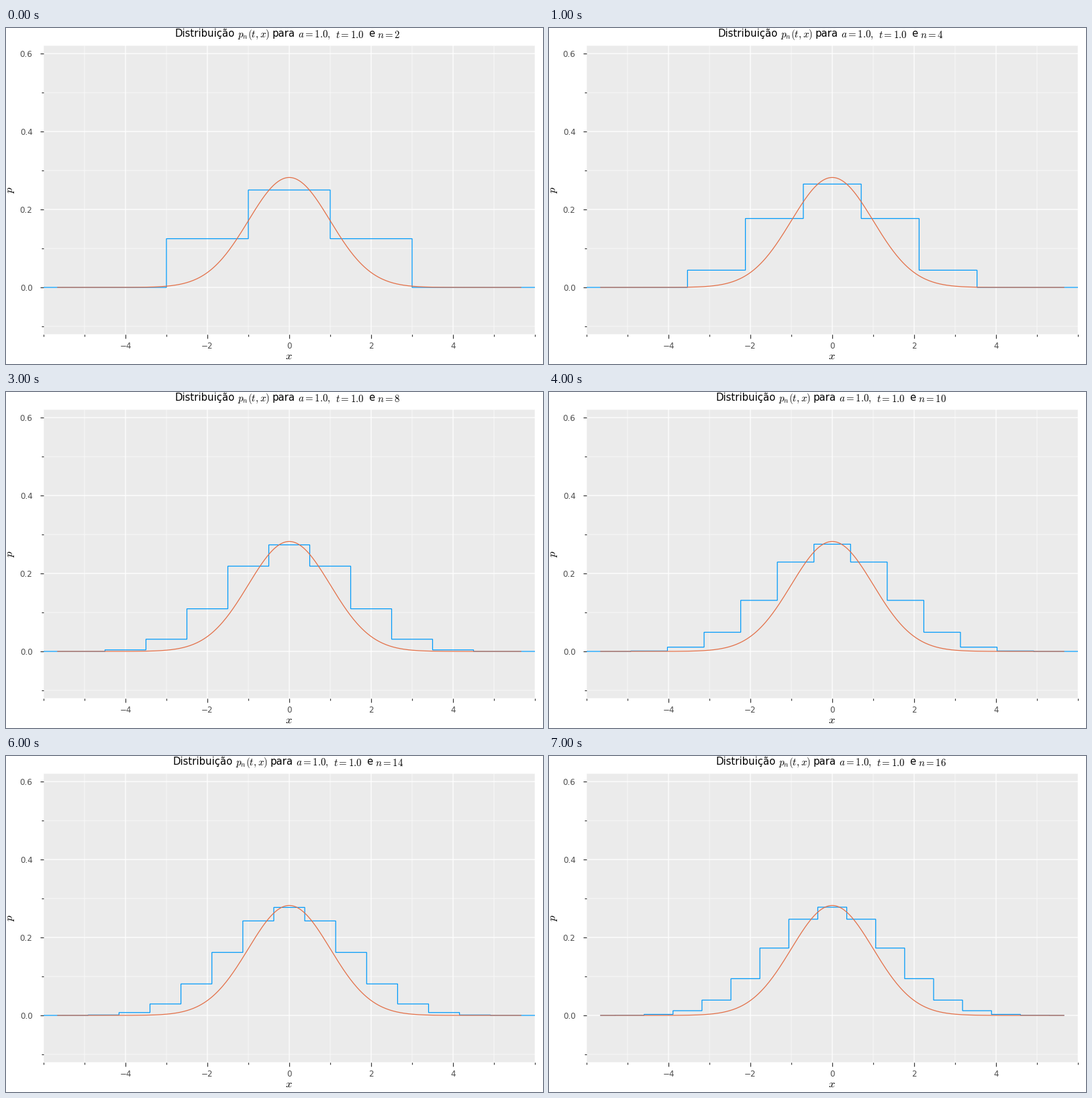
Write a matplotlib script that moves like this. It is 800 px wide and 500 px high and loops after 8000 ms.

```python
import math

import matplotlib.pyplot as plt
import numpy as np
from matplotlib.animation import FuncAnimation
from matplotlib.ticker import FormatStrFormatter, MultipleLocator

W, H, DPI = 800, 500, 100
PT = 72 / DPI  # points per pixel
LEFT, RIGHT, TOP, BOTTOM = 56, 788, 26.5, 455.6
BLUE, ORANGE = "#009afa", "#e36f47"
N_MAX = 16

plt.rcParams.update({
    "font.family": "DejaVu Sans",
    "mathtext.fontset": "cm",
    "path.snap": False,
})

fig = plt.figure(figsize=(W / DPI, H / DPI), dpi=DPI, facecolor="white")
ax = fig.add_axes([LEFT / W, 1 - BOTTOM / H, (RIGHT - LEFT) / W, (BOTTOM - TOP) / H],
                  facecolor="#ebebeb")
ax.set(xlim=(-6, 6), ylim=(-0.12, 0.62))
ax.set_axisbelow(True)
for spine in ax.spines.values():
    spine.set_visible(False)

ax.xaxis.set_major_locator(MultipleLocator(2))
ax.xaxis.set_minor_locator(MultipleLocator(1))
ax.yaxis.set_major_locator(MultipleLocator(0.2))
ax.yaxis.set_minor_locator(MultipleLocator(0.1))
ax.yaxis.set_major_formatter(FormatStrFormatter("%.1f"))
ax.set_xticks([-4, -2, 0, 2, 4])
ax.set_yticks([0, 0.2, 0.4, 0.6])
ax.grid(which="major", color="white", linewidth=1.3 * PT)
ax.grid(which="minor", color="white", linewidth=0.65 * PT)
ax.tick_params(which="major", length=5.5 * PT, width=1.2 * PT, color="#333333",
               labelcolor="#4d4d4d", labelsize=11.9 * PT)
ax.tick_params(which="minor", length=2.8 * PT, width=1.2 * PT, color="#333333")
ax.tick_params(axis="x", which="major", pad=6 * PT)
ax.tick_params(axis="y", which="major", pad=11 * PT)


def put(x, y, text, size, **kw):
    return fig.text(x / W, 1 - y / H, text, fontsize=size * PT, color="black", **kw)


put(421.5, 488.5, "$x$", 16.4, ha="center", va="center")
put(7.5, 240.5, "$p$", 16.4, ha="center", va="center", rotation=90)

TITLE = [
    (251.5, 13, "Distribuição"),
    (345.2, 13.5, "$p_n(t,x)$"),
    (396.8, 13, "para"),
    (434.6, 14, "$a=1.0,$"),
    (491, 15, "$t=1.0$"),
    (540.2, 13, "e"),
    (553, 15, "$n=2$"),
]
title = [put(x, y, s, 14.9, va="baseline") for x, y, s in TITLE]

steps, = ax.plot([], [], color=BLUE, lw=1.25 * PT, drawstyle="steps-mid",
                 solid_joinstyle="miter")
xs = np.linspace(-4 * math.sqrt(2), 4 * math.sqrt(2), 400)
ax.plot(xs, np.exp(-xs**2 / 2) / math.sqrt(4 * math.pi), color=ORANGE, lw=1.25 * PT)


def walk(n):
    """Density of an n-step random walk on its lattice."""
    dx = math.sqrt(2 / n)
    sites = range(-N_MAX, N_MAX + 1, 2)
    prob = [math.comb(n, (k + n) // 2) / 2**n if abs(k) <= n else 0 for k in sites]
    return np.array(sites) * dx, np.array(prob) / (2 * dx)


def draw(i):
    n = 2 * (i + 1)
    steps.set_data(*walk(n))
    shift = 3 if n >= 10 else 0
    for item, (x, _, _) in zip(title, TITLE):
        item.set_x((x - shift) / W)
    title[-1].set_text(f"$n={n}$")
    return [steps, *title]


anim = FuncAnimation(fig, draw, frames=8, interval=1000, repeat=True,
                     repeat_delay=0, blit=False)
plt.show()
```
